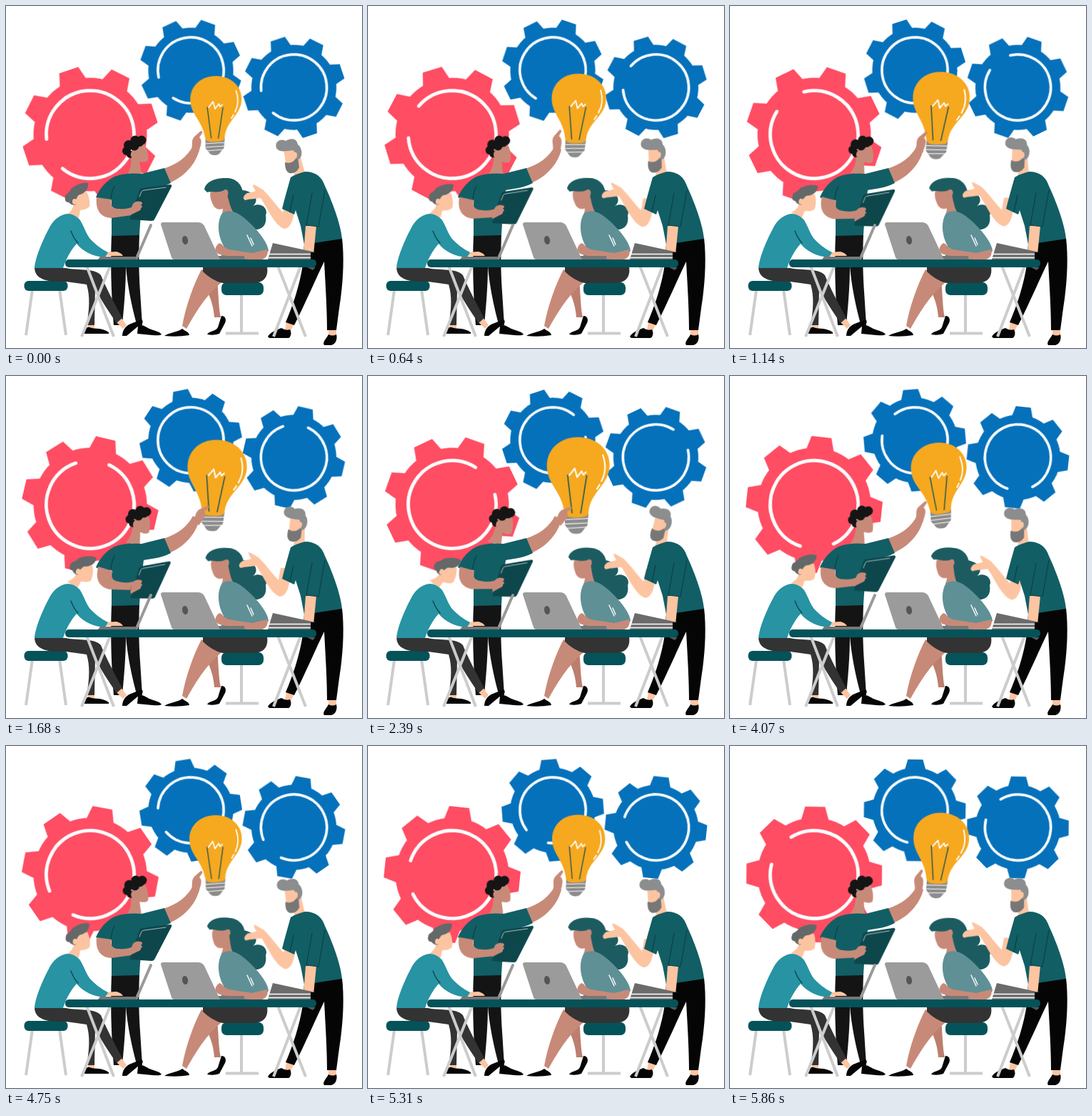
Animation of 499 by 479 pixels, one loop 5890 ms. Source, as an HTML page:

```html
<!DOCTYPE html>
<html lang="en">
<head>
<meta charset="utf-8">
<title>Team at work</title>
<style>
html, body { margin: 0; width: 100%; height: 100%; overflow: hidden; background: #fff; }
svg { display: block; }

.move { animation: 5.89s linear infinite; }
.spin { animation-name: spin; }
.nod { animation-name: nod; }
.pulse { animation-name: pulse; transform-origin: 293.5px 154px; }
.sway { animation-name: sway; }
.lower { animation-name: lower; }
.point { animation-name: point; transform-origin: 258px 208px; }
.lean { animation-name: lean; transform-origin: 312px 285px; }

@keyframes spin {
  from { transform: rotate(var(--from)); }
  to { transform: rotate(var(--to)); }
}
@keyframes nod {
  0%, 84.4% { transform: rotate(0deg); }
  42.2% { transform: rotate(var(--a)); }
  100% { transform: rotate(calc(var(--a) * .37)); }
}
@keyframes pulse {
  0%, 84.4% { transform: scale(1); }
  42.2% { transform: scale(1.23); }
  100% { transform: scale(1.085); }
}
@keyframes sway {
  0% { transform: var(--mid); animation-timing-function: cubic-bezier(.39, .575, .565, 1); }
  21.1% { transform: var(--hi); animation-timing-function: cubic-bezier(.445, .05, .55, .95); }
  63.3% { transform: var(--lo); animation-timing-function: cubic-bezier(.47, 0, .745, .715); }
  84.4% { transform: var(--mid); animation-timing-function: cubic-bezier(.39, .575, .7, 1); }
  100% { transform: var(--hi); }
}
@keyframes lower {
  0%, 81%, 84.4% { transform: translateY(0) rotate(0deg); }
  13%, 100% { transform: translateY(calc(var(--y) * .5)) rotate(calc(var(--r) * .5)); }
  30% { transform: translateY(var(--y)) rotate(var(--r)); }
  52% { transform: translateY(calc(var(--y) * .45)) rotate(calc(var(--r) * .45)); }
  69% { transform: translateY(calc(var(--y) * .13)) rotate(calc(var(--r) * .13)); }
}
@keyframes point {
  0%, 80.6%, 84.4% { transform: rotate(0deg); }
  13%, 100% { transform: rotate(-9deg); }
  28.5% { transform: rotate(19deg); }
  41% { transform: rotate(22deg); }
  52.3% { transform: rotate(20deg); }
  69% { transform: rotate(1deg); }
}
@keyframes lean {
  0% { transform: rotate(0deg); }
  11%, 100% { transform: rotate(2deg); }
  28% { transform: rotate(3deg); }
  52% { transform: rotate(8deg); }
  69%, 81% { transform: rotate(7.5deg); }
}

.line { fill: none; stroke-linecap: round; stroke-linejoin: round; }
.thin { stroke: #0c4045; stroke-width: 1.2; }
.white { stroke: #fff; }
.leg { stroke: #ccc; stroke-width: 4; stroke-linecap: butt; }
.tan { fill: #c88a78; }
.peach { fill: #fdc4a1; }
.black { fill: #050505; }
.coal { fill: #333; }
.teal { fill: #125e65; }
.deep { fill: #04535a; }
.hair { fill: #1c5c61; }
</style>
</head>
<body>
<svg width="499" height="479" viewBox="0 0 499 479">
  <defs>
    <path id="bar" d="M-14-95H14L20-74V74L14 95H-14L-20 74V-74Z"/>
    <g id="gear">
      <circle r="79.5"/>
      <use href="#bar"/>
      <use href="#bar" transform="rotate(45)"/>
      <use href="#bar" transform="rotate(90)"/>
      <use href="#bar" transform="rotate(135)"/>
      <circle class="line white" r="61.5" stroke-width="4.8" pathLength="360"
        stroke-dasharray="315 45" transform="rotate(12.5)"/>
    </g>
  </defs>

  <!-- gears -->
  <g style="--from:161.5deg;--to:587.9deg">
    <g transform="translate(118 180)" fill="#ff4d63"><use href="#gear" class="move spin"/></g>
    <g transform="translate(403.5 114) scale(.75)" fill="#0671bb"><use href="#gear" class="move spin"/></g>
  </g>
  <g transform="translate(259 90) scale(.75)" fill="#0671bb" style="--from:155deg;--to:-271.4deg">
    <use href="#gear" class="move spin"/>
  </g>

  <!-- bulb -->
  <g class="move pulse">
    <g class="move sway" style="--mid:rotate(.7deg);--hi:rotate(4.9deg);--lo:rotate(-3.5deg);transform-origin:293.5px 154px">
      <path fill="#8c8c8c" d="M280 185H307L306 199Q303 202 301 205Q299 209 293 209Q287 209 285 205L280 199Z"/>
      <path class="line white" stroke-width=".9" d="M279 193L308 191M279 198L308 196M281 203L305 201"/>
      <path fill="#f6a81f" d="M294 98C273 98 258 112 258 131C258 152 275 160 279 183Q280 189 285 190Q294 191 302 189Q307 188 307 183C309 160 330 152 330 130C330 112 315 98 294 98Z"/>
      <path class="line" stroke="#2a5a55" stroke-width="1.4" d="M282 142L288 185M304 142L298 185"/>
      <path class="line white" stroke-width="1.7" d="M284 142L287 138L290 134L293 144L298 137L300 141L303 138M322 118C326 129 325 140 321 148M319 152L316 157"/>
    </g>
  </g>

  <!-- standing man, left -->
  <path fill="#141414" d="M148 319H187C186 350 186 370 188 400L191 447L184 449C176 420 170 390 168 364C168 395 165 425 163 447H151C148 410 146 365 148 319Z"/>
  <path class="black" d="M185 448C191 445 195 449 201 452C208 455 216 456 218 460Q216 462 205 461L184 459Z"/>
  <g class="move nod" style="--a:17deg;transform-origin:183px 224px">
    <path class="tan" d="M176 198L194 194C198 200 200 210 199 216C195 220 190 218 187 218L190 235L170 236C175 228 176 220 175 210Z"/>
    <g fill="#151515">
      <circle cx="169" cy="203" r="6"/><circle cx="172" cy="195" r="7"/>
      <circle cx="181" cy="188" r="6.5"/><circle cx="190" cy="188" r="6.5"/>
      <circle cx="180" cy="196" r="6.5"/><circle cx="174" cy="208" r="5"/>
      <circle cx="187" cy="191" r="6"/>
    </g>
    <ellipse class="tan" cx="178" cy="208" rx="3.2" ry="4.5"/>
  </g>
  <path class="tan" d="M220 228C240 222 254 211 262 196L271 201C267 218 254 237 229 248Z"/>
  <g class="move point">
    <path class="tan" d="M260 202C262 195 259 188 264 183L273 175Q276 175 275 178L271 184C276 188 273 195 270 205Z"/>
  </g>
  <path class="teal" d="M152 239C165 234 180 234 190 235L222 227L231 248C215 256 201 256 193 258C190 280 188 300 187 321L148 322V272C141 273 133 272 126 268C131 256 140 245 152 239Z"/>
  <path class="line thin" d="M152 252Q148 260 147 270"/>
  <g class="move lower" style="--y:0px;--r:10deg;transform-origin:135px 282px">
    <path class="tan" d="M127 268C125 285 132 296 147 297L176 293L180 280C172 284 166 285 158 284C150 284 146 280 148 271Z"/>
  </g>
  <g class="move lower" style="--y:11.5px;--r:-3deg;transform-origin:200px 280px">
    <path fill="#0d474c" d="M187 258Q188 255 191 255L230 250Q233 250 232 253L208 299Q207 301 204 301L175 299Q173 299 174 296Z"/>
    <path class="line" stroke="#b7cccd" stroke-width=".9" d="M187 267L190 260Q191 258 194 258L224 254"/>
    <path class="tan" d="M174 287L178 277Q182 272 189 274Q193 276 189 279Q193 281 189 283Q190 286 184 288L174 293Z"/>
  </g>

  <!-- seated man -->
  <path class="line leg" d="M37 397L28 461M75 397L84 461"/>
  <rect class="deep" x="25.5" y="385" width="61" height="14" rx="6"/>
  <path class="peach" d="M115 444H124V453H115Z"/>
  <path class="black" d="M110 459C109 453 113 449 117 450C126 453 134 450 144 457V459Z"/>
  <path class="peach" d="M153 441L161 436L169 447L164 452Z"/>
  <path class="black" d="M163 462C163 455 167 448 175 445L190 439C193 442 192 445 187 447L169 462Z"/>
  <path class="coal" d="M40 366L84 367C104 371 124 367 133 377C139 392 151 415 163 437L155 444C144 428 132 410 125 396L124 447H113C117 425 118 406 113 390L84 386C60 387 40 384 40 366Z"/>
  <g class="move nod" style="--a:26deg;transform-origin:99px 290px">
    <path class="peach" d="M95 265L113 260C117 268 118 276 117 281C112 286 107 285 104 286L102 297L86 292C93 286 96 280 94 272Z"/>
    <path fill="#636869" d="M83 268C83 262 89 263 91 256C99 249 111 246 115 248C116 256 111 262 104 264C99 265 100 270 97 272L98 278C93 280 90 277 88 275C84 275 82 272 83 268Z"/>
    <ellipse class="peach" cx="96" cy="274" rx="3" ry="4"/>
  </g>
  <path class="peach" d="M138 345L155 344Q162 346 164 350H137Z"/>
  <path fill="#2793a3" d="M86 291C94 291 101 296 104 300C110 310 112 318 117 325C124 333 133 340 143 345L139 352C122 351 108 344 99 333C90 343 84 355 80 367L40 367C41 352 52 327 60 312C65 301 75 292 86 291Z"/>
  <path class="line thin" d="M91 315Q95 326 101 332"/>

  <!-- woman -->
  <path class="line leg" d="M330 403V458"/>
  <path class="line leg" stroke-width="3" d="M308 458.500H354"/>
  <rect class="deep" x="302" y="387" width="59" height="18" rx="7"/>
  <path fill="#bd7e6e" d="M280 396C288 410 291 423 292 436H301C298 424 298 405 296 382H290Z"/>
  <path class="tan" d="M274 369C263 390 252 420 247 448L253 452C264 432 280 405 302 387Z"/>
  <path class="black" d="M222 462C230 457 240 457 247 452C252 456 256 456 257 461Q240 464 222 462Z"/>
  <path class="black" d="M302 434C308 434 309 440 307 444L299 459Q291 462 282 460C284 455 294 456 297 450Z"/>
  <path class="coal" d="M276 365H366C368 379 362 388 345 388H304C295 387 282 378 276 372Z"/>
  <path class="hair" d="M318 258C338 255 354 264 350 275Q349 278 346 280C359 274 368 285 364 293C366 306 360 314 347 313C330 315 314 297 310 275Z"/>
  <g class="move lean">
    <path class="hair" d="M278 257C280 245 295 240 311 241C324 242 333 252 332 266C329 280 318 285 314 280L306 260C298 262 286 259 282 261Z"/>
    <path class="tan" d="M287 259Q300 262 306 257C312 263 311 275 318 288L302 300L304 284C298 286 294 284 291 280C287 272 285 266 287 259Z"/>
    <path class="hair" d="M280 258Q300 265 313 253L307 247L285 250Z"/>
    <ellipse class="tan" cx="308" cy="262" rx="3.500" ry="5"/>
  </g>
  <path fill="#5f9096" d="M303 290C316 282 330 292 343 305C358 320 367 333 368 343L354 357H300L305 336C297 322 295 302 303 290Z"/>
  <path class="line white" stroke-width="1.400" d="M338 321L345 336M343 325L347 334"/>
  <path class="tan" d="M366 341C369 350 362 357 350 356L318 352L300 348C291 345 292 337 299 332Q303 333 305 337L312 341L345 346Z"/>

  <!-- standing man, right -->
  <path class="peach" d="M393 442L404 445L399 455H391ZM452 451H463V463H452Z"/>
  <path class="black" d="M367 463C371 456 381 453 386 451Q392 455 398 453C401 458 399 464 396 465H369Z"/>
  <path class="black" d="M452 460Q458 463 463 460C465 466 462 474 456 475H446C443 471 449 466 452 460Z"/>
  <path class="black" d="M418 333L471 325C474 350 473 380 469 410C466 430 465 440 463 454H450C450 425 448 395 446 358C436 378 419 418 404 447L392 443C402 420 412 390 416 362Z"/>
  <g class="move nod" style="--a:23deg;transform-origin:409px 234px">
    <path class="peach" d="M389 199L405 197L413 212L419 234L404 240L404 231L393 226Z"/>
    <path fill="#777" d="M391 219Q397 221 402 218L409 211L411 226Q406 236 397 234Q391 232 391 219Z"/>
    <path fill="#8b8d8e" d="M379 199C376 190 385 185 392 189C400 184 408 186 409 194C416 199 416 212 410 215L404 213C402 208 406 204 402 202C393 203 384 206 379 199Z"/>
    <ellipse class="peach" cx="405" cy="209" rx="3" ry="4.500"/>
  </g>
  <g class="move sway" style="--mid:translate(0,0);--hi:translate(-7px,-3.5px);--lo:translate(5px,1.5px)">
    <path class="peach" d="M360 257C371 268 380 281 388 289L391 272H405C405 295 400 312 390 312C377 308 367 284 357 269C350 270 342 270 335 272C331 270 333 265 338 262Q345 261 350 259Q346 254 346 250C351 251 356 255 360 257Z"/>
  </g>
  <path class="teal" d="M399 240C405 236 412 234 419 232C435 232 443 240 447 252C460 280 470 310 471 326L418 334L413 308L406 286L404 292L387 284C391 268 395 254 399 240Z"/>
  <path class="peach" d="M420 308H435L431 348H417Z"/>
  <path class="line thin" d="M403 265L398 288M429 262L421 307L438 309L447 258"/>

  <!-- table -->
  <path class="line leg" d="M113 364L151 463M146 364L106 463M381 364L420 463M413 364L375 463"/>
  <path fill="#6b6b6b" d="M374 332L434 345V355H367Z"/>
  <path fill="#555" d="M422 366H434L430 370Z"/>
  <path class="line white" stroke-width="1.300" d="M368 347.500H428M368 352.500H428"/>
  <path class="black" d="M427 345H434V355H427Z"/>
  <path class="line" stroke="#999" stroke-width="4" d="M183 353L203 307"/>
  <path fill="#777" d="M129 355L132 351H184L182 355Z"/>
  <path fill="#777" d="M296 350H333Q336 352 333 355H296Z"/>
  <path fill="#9b9b9b" d="M217 306Q217 303 220 303H269Q275 303 278 308L300 355H236Q233 355 232 352Z"/>
  <ellipse cx="251" cy="328" rx="4" ry="6" fill="#555" transform="rotate(-10 251 328)"/>
  <rect class="deep" x="83" y="355" width="352" height="11" rx="5"/>
</svg>
</body>
</html>
```
